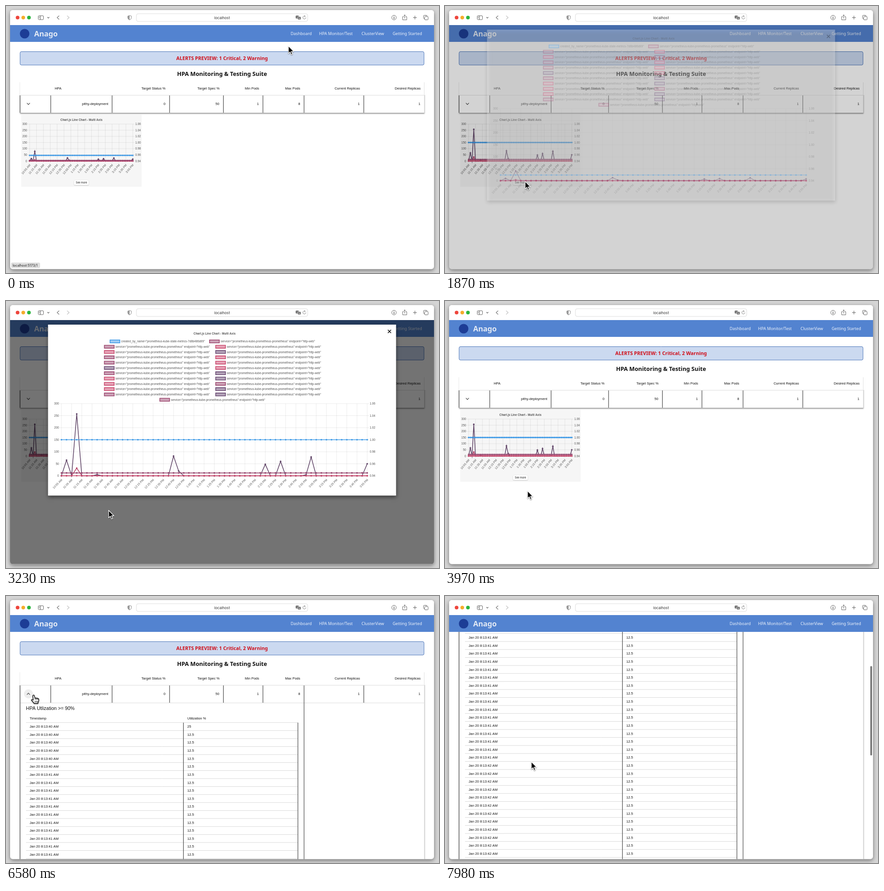
These frames come from a looping animation (953 px wide and 588 px high, 8 s). An HTML page with a canvas:

```html
<!DOCTYPE html>
<html lang="en">
<head>
<meta charset="utf-8">
<title>HPA Monitoring</title>
<style>
  html, body { margin: 0; width: 100%; height: 100%; overflow: hidden; background: #d5d5d5; }
  canvas { display: block; }
</style>
</head>
<body>
<canvas id="stage" width="953" height="588"></canvas>
<script>
const ctx = document.getElementById('stage').getContext('2d');
const LOOP = 8000;
const SANS = '"Liberation Sans", Arial, sans-serif';
const HEAD = '"Noto Sans", sans-serif';
const UI = 'Inter, sans-serif';
const SERVICE = 'service="prometheus-kube-prometheus-prometheus" endpoint="http-web"';
const CREATED = 'created_by_name="prometheus-kube-state-metrics-7d8b486d89"';
const ROW = 17.615, ROWS = 58, PANEL = 54 + ROWS * ROW;

// Series colours: border and fill, then one letter per legend entry
const COLORS = {
  b: ['#3f9ae6', '#9dcbf3'], m: ['#9c486f', '#cda2b7'],
  p: ['#c8486c', '#e7a4b8'], d: ['#6a4a72', '#b4a4b9'],
};
const LEGEND = 'bmmppdmpmpdpmdpdpmpdmdm';
const SPIKES = { 1: 65, 3: 257, 7: 5, 22: 82, 23: 20, 40: 48, 43: 60, 48: 4, 49: 78, 60: 50 };
const SERIES = [
  ['#624769', i => SPIKES[i] || 0],
  ['#b8476d', i => i === 3 ? 32 : 0],
  ['#c8486c', () => 0.5],
  ['#96466e', () => 12],
  ['#3f9ae6', () => 150],
];

const MINI = { x0: 52, x1: 279, y0: 260, y1: 341.3, step: 4, angle: 50, title: [166, 251] };
const FULL = { x0: 122, x1: 795, y0: 226, y1: 385, step: 2, angle: 46, title: [459, 71.5] };

// Pointer path: time, x, y
const POINTER = [
  [0, 622, 88], [600, 360, 165], [1000, 160, 232], [1140, 153, 262], [1240, 169, 288], [1300, 179, 294],
  [1500, 174, 345], [1690, 166, 389], [1850, 166, 389], [2000, 240, 370], [2110, 324, 345],
  [2170, 355, 336], [2400, 372, 340], [2700, 335, 400], [3230, 226, 461], [3370, 213, 461],
  [3400, 204, 460], [3600, 204, 460], [4000, 180, 415], [4400, 90, 320], [4600, 53, 255],
  [4700, 41, 227], [4860, 58, 219], [5060, 58, 219], [5320, 61, 218], [7150, 61, 218],
  [7500, 140, 315], [7940, 188, 363], [7980, 190, 365],
];

const clamp = (v, lo = 0, hi = 1) => Math.min(hi, Math.max(lo, v));
const ramp = (t, start, length) => clamp((t - start) / length);
const outQuart = p => 1 - (1 - p) ** 4;
const inOut = p => p < .5 ? 4 * p ** 3 : 1 - (2 - 2 * p) ** 3 / 2;

function pointerAt(t) {
  const n = Math.max(1, POINTER.findIndex(k => k[0] > t));
  const i = t >= POINTER.at(-1)[0] ? POINTER.length - 1 : n;
  const [a, b] = [POINTER[i - 1], POINTER[i]];
  const p = ramp(t, a[0], b[0] - a[0]);
  return [a[1] + (b[1] - a[1]) * p, a[2] + (b[2] - a[2]) * p];
}

function clock(i) {
  const minutes = 655 + i * 5, hour = Math.floor(minutes / 60);
  return `${(hour + 11) % 12 + 1}:${String(minutes % 60).padStart(2, '0')} ${hour < 12 ? 'AM' : 'PM'}`;
}

// Text is placed by the middle of its capitals
function text(str, x, y, size, color = '#111', align = 'left', family = SANS, weight = 400) {
  ctx.font = `${weight} ${size}px ${family}`;
  ctx.textAlign = align;
  ctx.fillStyle = color;
  ctx.fillText(str, x, y + size * .36);
}
function box(x, y, w, h, fill, r = 0, stroke, width = 1) {
  ctx.beginPath();
  ctx.roundRect(x, y, w, h, r);
  if (fill) { ctx.fillStyle = fill; ctx.fill(); }
  if (stroke) { ctx.strokeStyle = stroke; ctx.lineWidth = width; ctx.stroke(); }
}
function line(points, color, width = 1) {
  ctx.beginPath();
  points.forEach(([x, y]) => ctx.lineTo(x, y));
  ctx.strokeStyle = color;
  ctx.lineWidth = width;
  ctx.stroke();
}
function dot(x, y, r, fill) {
  ctx.beginPath();
  ctx.arc(x, y, r, 0, 7);
  ctx.fillStyle = fill;
  ctx.fill();
}
function shape(d, fill, stroke, width = 1) {
  const path = new Path2D(d);
  if (fill) { ctx.fillStyle = fill; ctx.fill(path); }
  if (stroke) { ctx.strokeStyle = stroke; ctx.lineWidth = width; ctx.stroke(path); }
}
function clipped(x, y, w, h, draw, r = 0) {
  ctx.save();
  ctx.beginPath();
  ctx.roundRect(x, y, w, h, r);
  ctx.clip();
  draw();
  ctx.restore();
}
function shadowed(color, blur, dy, draw) {
  ctx.save();
  Object.assign(ctx, { shadowColor: color, shadowBlur: blur, shadowOffsetY: dy });
  draw();
  ctx.restore();
}

function drawChart({ x0, x1, y0, y1, step, angle, title }, grow) {
  const px = i => x0 + (x1 - x0) * i / 60;
  const py = v => y1 - (y1 - y0) * v / 300;
  text('Chart.js Line Chart - Multi Axis', ...title, 6.35, '#555', 'center', SANS, 700);
  for (let v = 0; v <= 300; v += 50) {
    line([[x0 - 4, py(v)], [x1 + 4, py(v)]], 'rgba(0,0,0,.1)', .8);
    text(v, x0 - 5.5, py(v), 6.35, '#555', 'right');
    text((.94 + v / 2500).toFixed(2), x1 + 5.5, py(v), 6.35, '#555');
  }
  for (let i = 0; i <= 60; i += step) {
    line([[px(i), y0], [px(i), y1 + 4]], 'rgba(0,0,0,.1)', .8);
    ctx.save();
    ctx.translate(px(i), y1 + 8.5);
    ctx.rotate(-angle * Math.PI / 180);
    text(clock(i), 1, 0, 6.35, '#555', 'right');
    ctx.restore();
  }
  for (const [color, value] of SERIES) {
    const points = Array.from({ length: 61 }, (_, i) => [px(i), py(value(i) * grow)]);
    line(points, color, 1.6);
    points.forEach(([x, y]) => dot(x, y, 1.8, color));
  }
}

function drawTooltip(t, chart, [start, end, from, to], y) {
  const alpha = ramp(t, start, 200) - ramp(t, end, 200);
  if (alpha <= 0) return;
  const x = from + (to - from) * outQuart(ramp(t, start, 400));
  const index = (pointerAt(Math.min(t, end) - 60)[0] - chart.x0) / (chart.x1 - chart.x0) * 60;
  ctx.save();
  ctx.globalAlpha *= alpha;
  box(x, y, 239, 216, 'rgba(0,0,0,.8)', 3);
  text(clock(Math.round(clamp(index, 0, 60))), x + 3, y + 7.3, 6.35, '#fff', 'left', SANS, 700);
  [...LEGEND].forEach((key, i) => {
    const cy = y + 18 + i * 8.73;
    box(x + 3.5, cy - 3, 6, 6, COLORS[key][1], 0, COLORS[key][0], .8);
    const value = i === 0 ? 1 : i < 3 && chart === MINI ? 12 : 0;
    text(`${i ? SERVICE : CREATED}: ${value}`, x + 10.5, cy, 6.35, '#fff');
  });
  ctx.restore();
}

function drawToolbar() {
  const ink = '#666';
  box(9, 9, 933, 33, '#fff');
  dot(25.5, 25.5, 4, '#ee453c');
  dot(38, 25.5, 4, '#f5ac2b');
  dot(50.5, 25.5, 4, '#2cb53f');
  box(71, 21.5, 11.5, 8.5, null, 1.5, ink);
  shape('M75.5 21.5V30M72.5 24h1.5M72.5 26h1.5M91 24.5l2.2 2.2 2.2-2.2M117 21.3l-4.5 4.2 4.5 4.2', null, ink, 1.1);
  shape('M134.5 21.3l4.5 4.2-4.5 4.2', null, '#bbb', 1.1);
  shape('M272 21l4 1.2v4q-.5 3-4 4.5-3.500-1.500-4-4.500v-4z', '#fff', '#888');
  shape('M272 21v9.700q-3.500-1.500-4-4.500v-4z', '#999');
  box(287, 17, 377, 17, '#fff', 4, '#dcdcdc');
  text('localhost', 475.5, 26, 8.1, '#333', 'center', UI);
  box(637.5, 21, 7, 6.5, '#777', 1.5);
  box(642, 23.500, 7, 6.5, '#666', 1.5, '#fff', .7);
  text('A', 645.5, 26.8, 5, '#fff', 'center', UI);
  shape('M658.500 22.600a3.300 3.300 0 1 0 1.500 2.800M656.500 20.800l2.300 1.800-2.100 1.800', null, '#777', .9);
  shape('M859 25.500a5 5 0 1 1-10 0a5 5 0 1 1 10 0M854 22.500v5.500M852 26l2 2 2-2', null, ink);
  shape('M875.500 23.500h-2.500v7h9v-7h-2.500M877.500 27.500v-8M875.300 21.500l2.200-2.200 2.200 2.200', null, ink);
  shape('M900 21.500v8M896 25.500h8', null, ink, 1.1);
  box(919, 20.500, 7.500, 7.500, null, 1.5, ink);
  box(921.500, 23, 7.500, 7.500, '#fff', 1.5, ink);
}

function drawHeader() {
  box(9, 41.500, 933, 37.500, '#5383d0');
  dot(41, 61, 10.500, '#1d3d96');
  text('Anago', 62, 60.800, 16.200, '#e3eaf5', 'left', HEAD, 700);
  [['Dashboard', 626.500], ['HPA Monitor/Test', 689], ['ClusterView', 782.500], ['Getting Started', 851]]
    .forEach(([label, x]) => text(label, x, 60.800, 9, '#eef3fa', 'left', HEAD));
}

function drawPanel(height) {
  clipped(30, 235, 892, height, () => {
    text('HPA Utlization >= 90%', 44, 247.500, 10.600);
    text('Timestamp', 52, 269, 7.500);
    text('Utilization %', 399, 269, 7.500);
    for (let i = 0; i < ROWS; i++) {
      const y = 287.500 + i * ROW;
      const second = i < 6 ? 40 : i < 22 ? 41 : 42;
      line([[44, y - 8.800], [643, y - 8.800]], '#d9d9d9');
      text(`Jan 20 8:13:${second} AM`, 52, y, 7.600);
      text(i ? '12.5' : '25', 399, y, 7.600);
    }
    for (const x of [390.500, 642.500]) line([[x, 279], [x, 279 + ROWS * ROW]], '#444', 1.200);
    for (const x of [31, 656]) line([[x, 235], [x, 235 + height]], '#444', 1.200);
    line([[920.500, 235], [920.500, 235 + height]], '#e2e2e2');
  });
}

function drawTable(t, open) {
  const height = PANEL * open, bottom = 235.500 + height;
  shadowed('rgba(0,0,0,.5)', 2.500, 1, () => box(31, 168, 889.500, bottom - 168, '#fff'));
  box(28, 160, 896, 36, '#fff');
  line([[30.500, 168], [30.500, 196]], '#e8e8e8');
  line([[920.500, 168], [920.500, 235]], '#e2e2e2');
  line([[31, 196.500], [920, 196.500]], '#dcdcdc');
  line([[31, 235.500], [920, 235.500]], open ? '#dcdcdc' : '#b5b5b5');
  for (const x of [31, 98.500, 233.500, 360, 478.500, 565.500, 656, 787.500]) line([[x, 197], [x, 235]], '#444', 1.200);
  [['HPA', 122, 'pithy-deployment', 225], ['Target Status %', 351, 0, 351], ['Target Spec %', 470, 50, 469.500],
   ['Min Pods', 557, 1, 556.500], ['Max Pods', 647.500, 8, 647.500], ['Current Replicas', 779, 1, 778.500],
   ['Desired Replicas', 912.500, 1, 912]].forEach(([label, x, value, vx]) => {
    text(label, x, 181.500, 7.500, '#111', 'right');
    text(value, vx, 215.500, 7.600, '#111', 'right');
  });
  if (overButton(t)) dot(49.500, 215.500, 10, '#eeeeee');
  const flip = t > 5590 && t < LOOP ? -1 : 1;
  line([[46, 215.500 - 1.800 * flip], [49.300, 215.500 + 1.600 * flip], [52.600, 215.500 - 1.800 * flip]], '#444', 1.200);
  if (open) drawPanel(height);

  ctx.save();
  ctx.translate(0, height);
  box(33.500, 239, 265, 159, '#f6f6f6');
  drawChart(MINI, outQuart(ramp(t, -85, 1000)));
  shadowed('rgba(0,0,0,.35)', 1.500, .500, () => box(150, 384, 32, 10.500, '#fff', 1.500));
  text('See more', 166, 389.300, 5.500, '#111', 'center', UI);
  clipped(33.500, 240, 265, 135, () => {
    drawTooltip(t, MINI, [1144, 1500, 45, 46.200], 242);
    drawTooltip(t, MINI, [4300, 4590, 33.500, 33.500], 242);
  });
  ctx.restore();
}

function drawModal(t) {
  shadowed('rgba(0,0,0,.5)', 8, 3, () => box(92.500, 52, 766, 376.500, '#fff'));
  shape('M840.500 63.500l7 7M847.500 63.500l-7 7', null, '#111', 1.600);
  [...LEGEND].forEach((key, i) => {
    const row = i >> 1;
    const x = row === 0 ? [229, 448][i] : row === 11 ? 338.500 : [216.500, 461.500][i % 2];
    const y = 89 + row * 11.680;
    box(x, y - 3.200, 21.500, 6.400, COLORS[key][1], 0, COLORS[key][0], 1.600);
    text(i ? SERVICE : CREATED, x + 24.500, y, 6.350, '#555');
  });
  drawChart(FULL, outQuart(ramp(t, 1828, 1000)));
  drawTooltip(t, FULL, [2050, 2620, 97, 185], 162.500);
}

const modalAlpha = t => ramp(t, 1800, 225) - ramp(t, 3590, 195);
function overButton(t) {
  const [x, y] = pointerAt(t);
  return modalAlpha(t) === 0 && Math.hypot(x - 49.500, y - 215.500) < 13.500;
}

function drawPointer(t) {
  const [x, y] = pointerAt(t);
  const overChart = t < 5590 && x > 33 && x < 298 && y > 239 && y < 398;
  ctx.save();
  ctx.translate(x, y);
  ctx.lineJoin = 'round';
  Object.assign(ctx, { shadowColor: 'rgba(0,0,0,.4)', shadowBlur: 2, shadowOffsetY: 1 });
  if (modalAlpha(t) === 0 && (overChart || overButton(t))) {
    shape('M-2.200 1.500Q-.500-1.300 1.300 1.200L3 7Q4.500 5.500 6 7.200 7.500 6 9 7.700 11 7 11.300 10 11.500 14 9.500 16V18.500H1Q-1.500 15-5 11.500-5.300 8.500-1 11Z', '#fff', '#111', 1.300);
    shape('M3 7l.700 3M6 7.200l.500 3M9 7.700l.200 2.500M3 13v3M5.500 13v3M8 13v3', null, '#111', .900);
  } else {
    shape('M0 0V16.500L3.800 13 6.300 19 9 17.900 6.500 12H11.700Z', '#000', '#fff', 1.300);
  }
  ctx.restore();
}

function render(t) {
  const open = inOut(ramp(t, 5590, 455));
  const scroll = 301.800 * inOut(ramp(t, 7130, 820));
  box(0, 0, 953, 588, '#d5d5d5');
  shadowed('rgba(0,0,0,.45)', 10, 3, () => box(9, 9, 933, 570.500, '#fff', 6));
  clipped(9, 9, 933, 570.500, () => {
    ctx.save();
    ctx.translate(0, -scroll);
    box(31, 100.500, 889, 29.500, '#cbd9f0', 3, '#4a74b8');
    text('ALERTS PREVIEW: 1 Critical, 2 Warning', 475.500, 115.500, 10.700, '#d00d18', 'center', HEAD, 700);
    text('HPA Monitoring & Testing Suite', 475.500, 149, 12.700, '#111', 'center', HEAD, 700);
    drawTable(t, open);
    ctx.restore();
    drawHeader();
    if (scroll) box(936, 43.500 + scroll * .367, 4, 197, '#7b7b7b', 2);

    const status = 1 - ramp(t, 100, 250);
    if (status) {
      ctx.globalAlpha = status;
      box(11, 565, 64, 12, '#dedede', 3);
      text('localhost:5173/1', 14.500, 571, 7.300, '#222', 'left', UI);
      ctx.globalAlpha = 1;
    }
    const alpha = modalAlpha(t);
    if (alpha > 0) {
      ctx.globalAlpha = alpha;
      box(9, 41.500, 933, 538, 'rgba(0,0,0,.55)');
      drawModal(t);
      ctx.globalAlpha = 1;
    }
    drawToolbar();
  }, 6);
  drawPointer(t);
}

function tick(now) {
  render(now % LOOP);
  requestAnimationFrame(tick);
}
requestAnimationFrame(tick);
</script>
</body>
</html>
```
